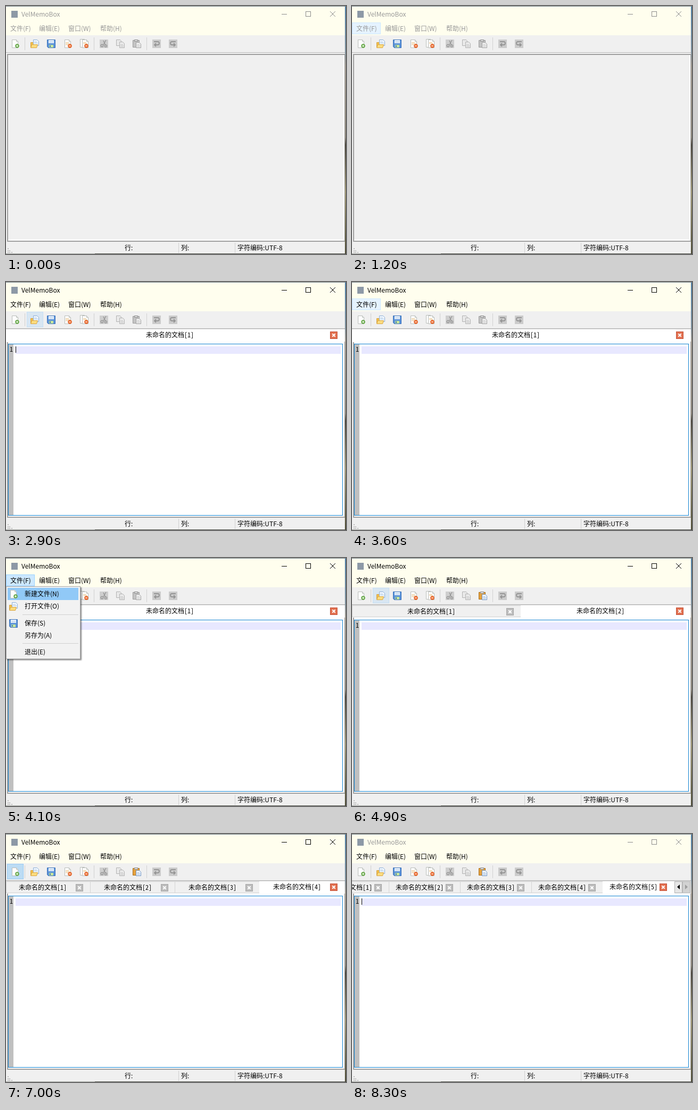
An HTML page that plays this animation: 639x466 px, repeating every 8.4 s.

```html
<!DOCTYPE html>
<html lang="zh-CN">
<head>
<meta charset="utf-8">
<title>VelMemoBox</title>
<style>
html, body { margin: 0; width: 639px; height: 466px; overflow: hidden; background: #f0f0f0; }
svg { display: block; }
rect, line { shape-rendering: crispEdges; }
text { font: 12px "Noto Sans CJK SC", "Noto Sans CJK", "Noto Sans", sans-serif; white-space: pre; }
.mono { font-family: "Noto Sans Mono CJK SC", "Noto Sans Mono", monospace; }
.ctl { fill: none; stroke: #000; }
.dim text { fill: #999; }
.dim .ctl { stroke: #8c8c8c; }
.sep { fill: #d0d0d0; }
#menu { filter: drop-shadow(2px 2px 1px rgba(0, 0, 0, .45)); }
</style>
</head>
<body>
<svg width="639" height="466" viewBox="0 0 639 466">
  <defs>
    <linearGradient id="desk" x2="0" y2="1">
      <stop offset="0" stop-color="#4f7fa6"/>
      <stop offset=".18" stop-color="#7c8f9c"/>
      <stop offset=".24" stop-color="#a39c92"/>
      <stop offset=".53" stop-color="#8d877c"/>
      <stop offset=".56" stop-color="#4a463d"/>
      <stop offset=".75" stop-color="#a29a78"/>
      <stop offset="1" stop-color="#4c4a33"/>
    </linearGradient>
    <g id="page">
      <path d="M2.5 .5h8l3 3v12h-11z" fill="#fdfdfd" stroke="#b9bdb9"/>
      <path d="M10.5 .5v3h3" fill="#e9ece9" stroke="#b9bdb9"/>
    </g>
    <g id="minus">
      <circle cx="12" cy="12" r="3.500" fill="#ee6a2c" stroke="#d2551f" stroke-width=".6"/>
      <path d="M10 12h4" stroke="#fff" stroke-width="1.2"/>
    </g>
    <g id="new">
      <use href="#page"/>
      <circle cx="12" cy="12" r="3.400" fill="#6bb04a" stroke="#4a8f30" stroke-width=".6"/>
      <path d="M10 12h4M12 10v4" stroke="#fff" stroke-width="1.2"/>
    </g>
    <g id="open">
      <path d="M.5 5.500h5l1 2h4v7h-10z" fill="#f4c04a" stroke="#d3a040"/>
      <path d="M5.500 .5h7l3 3v8h-10z" fill="#eef5fd" stroke="#8fb0d8"/>
      <path d="M7 4.500h5M7 6.500h7" stroke="#b5cde8"/>
      <path d="M.5 15.500l2-6h11l-2 6z" fill="#fbdc7e" stroke="#d9a645"/>
    </g>
    <g id="save">
      <path d="M.5 .5h15v15h-13l-2-2z" fill="#5a92d8" stroke="#3a70b8"/>
      <path d="M3 1h10v6h-10z" fill="#f1f7fd"/>
      <path d="M4 3.500h8M4 5.500h8" stroke="#b4cdea"/>
      <path d="M4 10h8v5h-8z" fill="#c6e59a"/>
      <path d="M5 11h2v3h-2z" fill="#3f76bc"/>
    </g>
    <g id="shut">
      <use href="#page"/>
      <path d="M4 5.500h6M4 7.500h7M4 9.500h5" stroke="#ecc78f"/>
      <use href="#minus"/>
    </g>
    <g id="shutAll">
      <use href="#page" x="-2" y="-1"/>
      <use href="#page" x="2"/>
      <path d="M6 5.500h6M6 7.500h7" stroke="#ecc78f"/>
      <use href="#minus"/>
    </g>
    <g id="cut">
      <path d="M0 0h16v16h-16z" fill="#cecece"/>
      <path d="M12 1L7 10M7 2l4 9" stroke="#969696" stroke-width="1.4"/>
      <g fill="none" stroke="#989898" stroke-width="1.500">
        <circle cx="4.500" cy="11.500" r="2.200"/><circle cx="11.500" cy="12" r="2"/>
      </g>
    </g>
    <g id="copy" fill="#e9e9e9" stroke="#b2b2b2">
      <path d="M.5 .5h7l2 2v9h-9z"/>
      <path d="M6.500 4.500h6l3 3v8h-9z"/>
      <path d="M8 9.500h5M8 11.500h6M8 13.500h6" stroke="#c9c9c9"/>
    </g>
    <g id="paste">
      <path d="M.5 1.500h12v13h-12z" fill="var(--board, #c4c4c4)" stroke="var(--edge, #9a9a9a)"/>
      <path d="M3.500 .5h6v3h-6z" fill="#dedede" stroke="#8c8c8c"/>
      <path d="M6.500 5.500h6l3 3v7h-9z" fill="var(--sheet, #ececec)" stroke="var(--ink, #a2a2a2)"/>
      <path d="M8 9.500h5M8 11.500h6M8 13.500h6" stroke="var(--ink, #bbb)" stroke-width=".6"/>
    </g>
    <g id="undo">
      <path d="M0 0h16v16h-16z" fill="#cbcbcb"/>
      <path d="M3 4h7q3 0 3 3t-3 3h-6M7 7L4 10L7 13" fill="none" stroke="#959595" stroke-width="1.800"/>
    </g>
    <g id="cross"><path d="M-2.700 -2.700l5.400 5.400M2.700 -2.700l-5.400 5.400" stroke="#fff" stroke-width="2"/></g>
  </defs>

  <rect width="639" height="466" fill="url(#desk)"/>
  <rect width="637" height="465" fill="#f0f0f0"/>
  <rect width="637" height="55" fill="#fffeee"/>
  <rect width="639" height="1" fill="#72808a"/>
  <rect x="167" y="465" width="472" height="1" fill="#44463f"/>
  <rect y="465" width="167" height="1" fill="#9a9d98"/>

  <g id="title">
    <rect x="10" y="9" width="12" height="13" fill="#8d99a6"/>
    <text x="29" y="20">VelMemoBox</text>
    <path class="ctl" d="M518 15.500h10M563.500 10.500h9v9h-9z" shape-rendering="crispEdges"/>
    <path class="ctl" d="M609 10l10 10M619 10l-10 10"/>
  </g>

  <rect id="file" x=".5" y="31.500" width="53" height="21"/>
  <g id="bar">
    <text x="8" y="47">文件(F)</text>
    <text x="62" y="47">编辑(E)</text>
    <text x="117" y="47">窗口(W)</text>
    <text x="177" y="47">帮助(H)</text>
  </g>

  <rect id="hover" y="56.500" width="30" height="28"/>
  <g class="sep">
    <rect x="35" y="59" width="1" height="24"/>
    <rect x="165" y="59" width="1" height="24"/>
    <rect x="264" y="59" width="1" height="24"/>
  </g>
  <use href="#new" x="9" y="63"/>
  <use href="#open" x="46" y="63"/>
  <use href="#save" x="77" y="63"/>
  <use href="#shut" x="108" y="63"/>
  <use href="#shutAll" x="139" y="63"/>
  <use href="#cut" x="176" y="63"/>
  <use href="#copy" x="207" y="63"/>
  <use id="pasteBtn" href="#paste" x="238" y="63"/>
  <use href="#undo" x="275" y="63"/>
  <use href="#undo" transform="translate(322 63) scale(-1 1)"/>

  <rect y="87" width="637" height="1" fill="#b0b0b0"/>
  <rect y="88" width="637" height="1" fill="#fff"/>
  <path d="M2 442V90H636V92H4V442z" fill="#a0a0a0"/>
  <path d="M634 92h2v349h-632v-2h630z" fill="#fff"/>
  <rect x="2" y="441" width="635" height="2" fill="#a0a0a0"/>
  <rect x="636" y="90" width="1" height="352" fill="#a8a8a8"/>

  <g id="editor">
    <rect x="4" y="112" width="631" height="327" fill="#fff"/>
    <rect x="4.500" y="116.500" width="628" height="322" fill="#fff" stroke="#0f82d2"/>
    <rect x="5" y="117" width="9" height="321" fill="#c0c0c0"/>
    <rect x="18" y="121" width="611" height="14" fill="#e8e8ff"/>
    <text class="mono" x="7" y="131">1</text>
    <rect id="caret" x="18" y="121" width="1" height="12"/>
    <g id="tabs"></g>
  </g>

  <g fill="#bdbdbd">
    <rect x="3" y="455" width="2" height="2"/>
    <rect x="3" y="459" width="2" height="2"/><rect x="6" y="459" width="2" height="2"/>
    <rect x="3" y="462" width="2" height="2"/><rect x="6" y="462" width="2" height="2"/><rect x="10" y="462" width="2" height="2"/>
  </g>
  <g class="sep">
    <rect x="324" y="445" width="1" height="19"/>
    <rect x="430" y="445" width="1" height="19"/>
  </g>
  <text x="223" y="459">行:</text>
  <text x="329" y="459">列:</text>
  <text x="435" y="459">字符编码:UTF-8</text>

  <g id="menu">
    <rect x=".5" y="53.500" width="139" height="136" fill="#f2f2f2" stroke="#a8a8a8"/>
    <rect id="pick" x="3" y="56" width="133" height="23" fill="#91c9f7"/>
    <use href="#new" x="6" y="60"/>
    <use href="#open" x="6" y="83"/>
    <use href="#save" x="6" y="115"/>
    <text x="35" y="72">新建文件(N)</text>
    <text x="35" y="95">打开文件(O)</text>
    <text x="35" y="127">保存(S)</text>
    <text x="35" y="150">另存为(A)</text>
    <text x="35" y="181">退出(E)</text>
    <rect class="sep" x="31" y="106" width="105" height="1"/>
    <rect class="sep" x="31" y="160" width="105" height="1"/>
  </g>
</svg>
<script>
const LOOP = 8400;
const $ = id => document.getElementById(id);

// Each step changes only the listed parts of the state.
const steps = [
  [0, { title: 0, bar: 0, file: '', hover: '', down: 0, menu: 0, pick: 0, docs: 0, caret: 0, paste: 0 }],
  [1200, { file: 'hot' }],
  [1900, { title: 1, bar: 1, file: 'down', menu: .6 }],
  [2000, { menu: 1 }],
  [2400, { pick: 1 }],
  [2900, { file: '', menu: 0, pick: 0, docs: 1, caret: 1, hover: 'open' }],
  [3200, { hover: 'save' }],
  [3400, { hover: 'open', caret: 0 }],
  [3500, { hover: '' }],
  [3600, { file: 'hot' }],
  [3900, { file: 'down', caret: 1 }],
  [4000, { menu: .6 }],
  [4100, { menu: 1, pick: 1 }],
  [4400, { file: '', menu: 0, pick: 0, docs: 2, hover: 'open', paste: 1 }],
  [4600, { hover: 'save' }],
  [4900, { hover: 'open', caret: 0 }],
  [5100, { hover: '' }],
  [5200, { hover: 'new' }],
  [5400, { caret: 1 }],
  [5700, { down: 1 }],
  [5800, { down: 0, docs: 3 }],
  [6200, { down: 1 }],
  [6300, { caret: 0 }],
  [6400, { down: 0, docs: 4, caret: 1 }],
  [6900, { caret: 0 }],
  [7000, { down: 1 }],
  [7100, { down: 0, docs: 5, caret: 1 }],
  [7600, { hover: 'open', caret: 0 }],
  [7700, { hover: '' }],
  [8100, { caret: 1 }],
  [8300, { title: 0 }]
];
const buttonX = { new: 2.5, open: 39.5, save: 70.5 };

const rect = (x, y, w, h, fill, stroke = 'none') =>
  `<rect x="${x}" y="${y}" width="${w}" height="${h}" fill="${fill}" stroke="${stroke}"/>`;

function tab(i, from, to, active, nudge) {
  const y = active ? 100 : 101;
  const x = Math.round((from + to) / 2 - 54.5 - nudge / 2);
  const cx = Math.ceil(to - 20) - nudge;
  const left = Math.floor(from), width = Math.floor(to) - left;
  const body = active
    ? rect(left, 88, width + 1, 25, '#fff')
    : rect(left + .5, 89.5, width, 21, '#f0f0f0', '#d4d4d4');
  const box = active ? ['#e2704f', '#c4523a'] : ['#bcbcbc', '#a6a6a6'];
  return body + `<text class="mono" x="${x}" y="${y + 4}">未命名的文档[${i + 1}]</text>` +
    rect(cx - 6.5, y - 6.5, 13, 13, ...box) + `<use href="#cross" x="${cx}" y="${y}"/>`;
}

function tabBar(n) {
  const scrolled = n > 4;
  const edge = i => scrolled ? 134 * i - 65 : 635.5 * i / n;
  let out = rect(0, 88, 637, 24, n > 1 ? '#f6f6f6' : '#fff');
  for (let i = 0; i < n; i++) {
    out += tab(i, edge(i), edge(i + 1), i === n - 1, i || scrolled || n === 1 ? 0 : 1);
  }
  if (scrolled) {
    out += rect(606, 88, 31, 24, '#f0f0f0') +
      rect(606.5, 89.5, 14, 21, '#e6e6e6', '#b2b2b2') +
      rect(621.5, 89.5, 14, 21, '#d2d2d2', '#b8b8b8') +
      '<path d="M616 95v9l-5-4.500z"/><path d="M626 95v9l5-4.500z" fill="#9c9c9c"/>';
  }
  return out + rect(0, 88, 637, 1, '#dedede');
}

function paint(el, fill, stroke) {
  el.setAttribute('fill', fill);
  el.setAttribute('stroke', stroke);
}

const show = (id, opacity) => { $(id).style.opacity = opacity; };

function render(s) {
  $('title').setAttribute('class', s.title ? '' : 'dim');
  $('bar').setAttribute('class', s.bar ? '' : 'dim');
  show('file', s.file ? 1 : 0);
  if (s.file === 'hot') paint($('file'), '#e5f3ff', '#cce8ff');
  else paint($('file'), '#cce8ff', '#99d1ff');
  show('hover', s.hover ? 1 : 0);
  if (s.hover) $('hover').setAttribute('x', buttonX[s.hover]);
  if (s.down) paint($('hover'), '#bcdcf4', '#98cbf2');
  else paint($('hover'), '#d8e6f2', '#c5dff4');
  $('pasteBtn').style.cssText = s.paste
    ? '--board:#e5a13c;--edge:#a9701f;--sheet:#f3f8fe;--ink:#6f94c4' : '';
  show('editor', s.docs ? 1 : 0);
  $('tabs').innerHTML = s.docs ? tabBar(s.docs) : '';
  show('caret', s.caret);
  show('menu', s.menu);
  show('pick', s.pick);
}

let shown = -1;
const start = performance.now();

function tick() {
  const t = (performance.now() - start) % LOOP;
  const count = steps.filter(([at]) => at <= t).length;
  if (count !== shown) {
    shown = count;
    render(Object.assign({}, ...steps.slice(0, count).map(([, change]) => change)));
  }
  requestAnimationFrame(tick);
}
tick();
</script>
</body>
</html>
```
